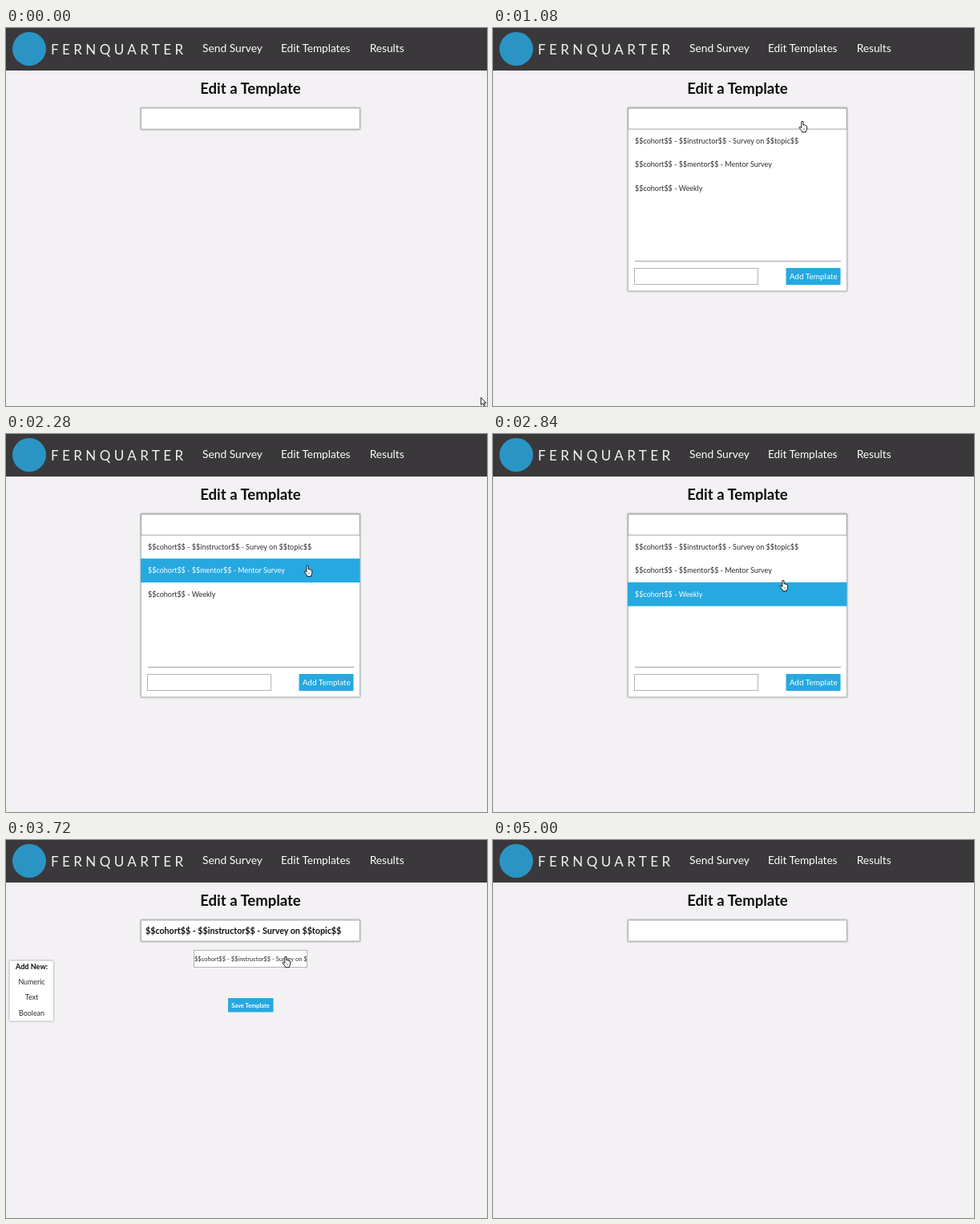
Write an HTML page that moves like this. It is 600x471 px and loops after 5040 ms.

```html
<!DOCTYPE html>
<html lang="en">
<head>
<meta charset="utf-8">
<title>Edit a Template</title>
<style>
html, body { margin: 0; width: 100%; height: 100%; overflow: hidden; background: #f3f1f4; }
svg { display: block; width: 100%; height: 100%; font-family: Lato, "Open Sans", sans-serif; }
text { white-space: pre; }
.lift { filter: drop-shadow(.7px .8px 1px rgba(0, 0, 0, .5)); }
</style>
</head>
<body>
<svg id="stage" viewBox="0 0 600 471">
  <defs>
    <clipPath id="nameClip"><rect x="235" y="138" width="140" height="20"/></clipPath>
  </defs>
</svg>
<script>
const LOOP = 5040, STEP = 40;
const OPEN_AT = 1000, PICK_AT = 3600, CARDS_AT = 3840, RESET_AT = 4840;
const BLUE = '#26a9e0', RED = '#d9534f', INK = '#2b2b2b', LINE = '#b4b4b8';
const ROW_TOP = 126, ROW_H = 29.5, HOVER_LAG = 80;
const TEMPLATES = [
  '$$cohort$$ - $$instructor$$ - Survey on $$topic$$',
  '$$cohort$$ - $$mentor$$ - Mentor Survey',
  '$$cohort$$ - Weekly'
];
const QUESTIONS = [
  'How well was the Instructor prepared?',
  'How well did the Instructor explain things?',
  'How well did the Instructor do overall?'
];
// pointer path: time, x, y
const PATH = [
  [0, 592, 460], [160, 588, 452], [600, 482, 280], [880, 392, 120],
  [1080, 386, 116], [1680, 386, 119], [1920, 380, 135], [2120, 379, 150],
  [2400, 374, 174], [2680, 366, 200], [2840, 362, 182], [2880, 362, 182],
  [3200, 354, 150], [3480, 349, 143], [3720, 349, 145], [3840, 358, 178],
  [4080, 446, 480]
];

const stage = document.getElementById('stage');

function add(parent, tag, attrs) {
  const el = document.createElementNS('http://www.w3.org/2000/svg', tag);
  for (const k in attrs) el.setAttribute(k, attrs[k]);
  parent.appendChild(el);
  return el;
}
const group = (parent, attrs) => add(parent, 'g', attrs);

function box(parent, x, y, width, height, fill, more) {
  return add(parent, 'rect', { x, y, width, height, fill, ...more });
}
function input(parent, x, y, w, h) {
  return box(parent, x + .5, y + .5, w - 1, h - 1, '#fff', { stroke: LINE });
}
function label(parent, str, x, y, size, more) {
  const el = add(parent, 'text', { x, y, 'font-size': size, fill: INK, ...more });
  el.textContent = str;
  return el;
}
const MID = { 'text-anchor': 'middle' };
const BOLD = { 'font-weight': 700, fill: '#0c0c0c' };

function show(el, on) {
  el.setAttribute('display', on ? 'inline' : 'none');
}

function buildHeader() {
  box(stage, 0, 0, 600, 53, '#3a383a');
  add(stage, 'circle', { cx: 29, cy: 26, r: 21, fill: '#2a95c5' });
  const white = { fill: '#fff' };
  label(stage, 'FERNQUARTER', 56, 32.5, 17, { fill: '#f2f2f2', 'letter-spacing': 4.4 });
  label(stage, 'Send Survey', 245, 30.3, 13.8, white);
  label(stage, 'Edit Templates', 343, 30.3, 13.6, white);
  label(stage, 'Results', 453.7, 30.3, 13.7, white);
  label(stage, 'Edit a Template', 305, 82, 18.5, { ...MID, ...BOLD });
}

function buildField() {
  const g = group(stage);
  box(g, 168.5, 100, 272.7, 26, '#fff', { class: 'lift', stroke: '#b0b0b0', 'stroke-width': .8 });
  return g;
}

function buildMenu() {
  const g = group(stage);
  box(g, 168.5, 99.7, 272.7, 228, '#fff', { class: 'lift', stroke: '#bcbcbc', 'stroke-width': .7 });
  box(g, 168.5, 100, 272.7, 26, '#fff', { stroke: '#a2a2a8' });
  const rows = TEMPLATES.map((name, i) => {
    const y = ROW_TOP + i * ROW_H;
    return {
      bar: box(g, 168, y - .3, 273.5, ROW_H + .3, BLUE),
      text: label(g, name, 177, y + 17.7, 9)
    };
  });
  box(g, 177, 290, 257, 1, '#a5a5aa');
  input(g, 176, 299, 155, 21);
  box(g, 365.5, 299, 68, 21, BLUE);
  label(g, 'Add Template', 399.7, 312.8, 10, { ...MID, fill: '#fff' });
  return { g, rows };
}

function buildEditor() {
  const g = group(stage);
  label(g, TEMPLATES[0], 174, 116.5, 10.7, BOLD);
  input(g, 234, 137, 142, 22);
  const clip = group(g, { 'clip-path': 'url(#nameClip)' });
  label(clip, TEMPLATES[0].split('$$topic')[0] + '$', 235, 150.7, 7.5);
  box(g, 4.5, 150.5, 54.5, 75, '#fff', { class: 'lift' });
  label(g, 'Add New:', 32, 161.3, 9.1, { ...MID, ...BOLD });
  ['Numeric', 'Text', 'Boolean'].forEach((s, i) =>
    label(g, s, 32, 179.6 + i * 19.6, 8.9, MID));
  return g;
}

function buildSave() {
  const g = group(stage);
  box(g, 277, 197, 56.5, 17.5, BLUE);
  label(g, 'Save Template', 305, 208.5, 7.5, { ...MID, ...BOLD, fill: '#fff' });
  return g;
}

function buildCard(parent, question, i) {
  const g = group(parent, { transform: `translate(0 ${170 + i * 102.2})` });
  const white = { fill: '#fff' };
  box(g, 168, 0, 273.5, 86, '#fff', { class: 'lift' });
  box(g, 168, 0, 237, 22.5, BLUE);
  box(g, 405, 0, 36.5, 22.5, RED);
  box(g, 173.5, 8.5, 6.5, 6.5, '#fff', { stroke: '#555', 'stroke-width': .6, rx: .8 });
  add(g, 'path', { d: 'M174.8 11.6l1.6 1.8 2.7-4', fill: 'none', stroke: '#222', 'stroke-width': 1.1 });
  label(g, 'Required', 184, 15, 8.1, white);
  input(g, 223, 5, 164, 14);
  label(g, question, 305, 14.5, 7.5, MID);
  label(g, 'Delete', 423.3, 14.3, 8.9, { ...MID, ...white });
  [['Very Poor', 1, 237], ['Very Good', 10, 372]].forEach(([word, num, x]) => {
    input(g, x - 27.5, 36, 55, 14);
    label(g, word, x, 45.6, 7.3, MID);
    input(g, x - 14, 63, 28, 14);
    label(g, num, x, 72.7, 7.3, MID);
  });
  box(g, 270, 41.5, 70, 3, '#dadadc', { rx: 1.2 });
  add(g, 'circle', { cx: 308, cy: 43.8, r: 4.9, fill: BLUE });
  label(g, '6', 305, 72, 11, { ...MID, ...BOLD });
}

function buildCards() {
  const g = group(stage);
  QUESTIONS.forEach((q, i) => buildCard(g, q, i));
  return g;
}

function buildPointer() {
  const g = group(stage, { 'stroke-linejoin': 'round' });
  const arrow = add(g, 'path', {
    d: 'M.5 .5V9.6L2.6 7.6 4 10.7 5.5 10 4.1 7.1H7Z',
    fill: '#fff', stroke: '#111', 'stroke-width': .9
  });
  const hand = group(g);
  add(hand, 'path', {
    d: 'M-1.2 .8Q0-.5 1 .8V4.8Q2.4 4.1 2.9 5.2Q4.2 4.8 4.5 5.9Q5.6 5.8 5.6 7.2V10Q5.3 11.4 4.5 12.2V13.7H-.7V12.4L-4 8.2Q-4.1 6.9-2.7 7.2L-1.2 8.5Z',
    fill: '#fff', stroke: '#111', 'stroke-width': .95
  });
  add(hand, 'path', { d: 'M1.2 8.8V11.2M2.7 8.8V11.2', stroke: '#555', 'stroke-width': .5 });
  return { g, arrow, hand };
}

buildHeader();
const field = buildField();
const menu = buildMenu();
const editor = buildEditor();
const save = buildSave();
const cards = buildCards();
const pointer = buildPointer();

function pointerAt(t) {
  const i = PATH.findIndex(p => p[0] > t);
  if (i < 0) return null;
  const [t0, x0, y0] = PATH[i - 1], [t1, x1, y1] = PATH[i];
  const k = (t - t0) / (t1 - t0);
  return { x: x0 + (x1 - x0) * k, y: y0 + (y1 - y0) * k };
}

function drawPointer(t, isOpen) {
  const p = pointerAt(t);
  show(pointer.g, p);
  if (!p) return;
  const bottom = isOpen ? ROW_TOP + 3 * ROW_H : ROW_TOP;
  const inMenu = p.x > 168 && p.x < 442 && p.y > 100 && p.y < bottom;
  const isHand = inMenu || (t >= PICK_AT && t < 3760);
  pointer.g.setAttribute('transform', `translate(${p.x.toFixed(1)} ${p.y.toFixed(1)})`);
  show(pointer.arrow, !isHand);
  show(pointer.hand, isHand);
}

function draw(time) {
  const t = Math.floor((time % LOOP) / STEP) * STEP;
  const isOpen = t >= OPEN_AT && t < PICK_AT;
  const isPicked = t >= PICK_AT && t < RESET_AT;
  const hasCards = isPicked && t >= CARDS_AT;
  show(field, !isOpen);
  show(menu.g, isOpen);
  show(editor, isPicked);
  show(save, isPicked && !hasCards);
  show(cards, hasCards);
  if (isOpen) {
    const hover = Math.floor((pointerAt(t - HOVER_LAG).y - ROW_TOP) / ROW_H);
    menu.rows.forEach(({ bar, text }, i) => {
      show(bar, i === hover);
      text.setAttribute('fill', i === hover ? '#fff' : INK);
    });
  }
  drawPointer(t, isOpen);
}

const start = performance.now();
function tick() {
  draw(performance.now() - start);
  requestAnimationFrame(tick);
}
tick();
</script>
</body>
</html>
```
